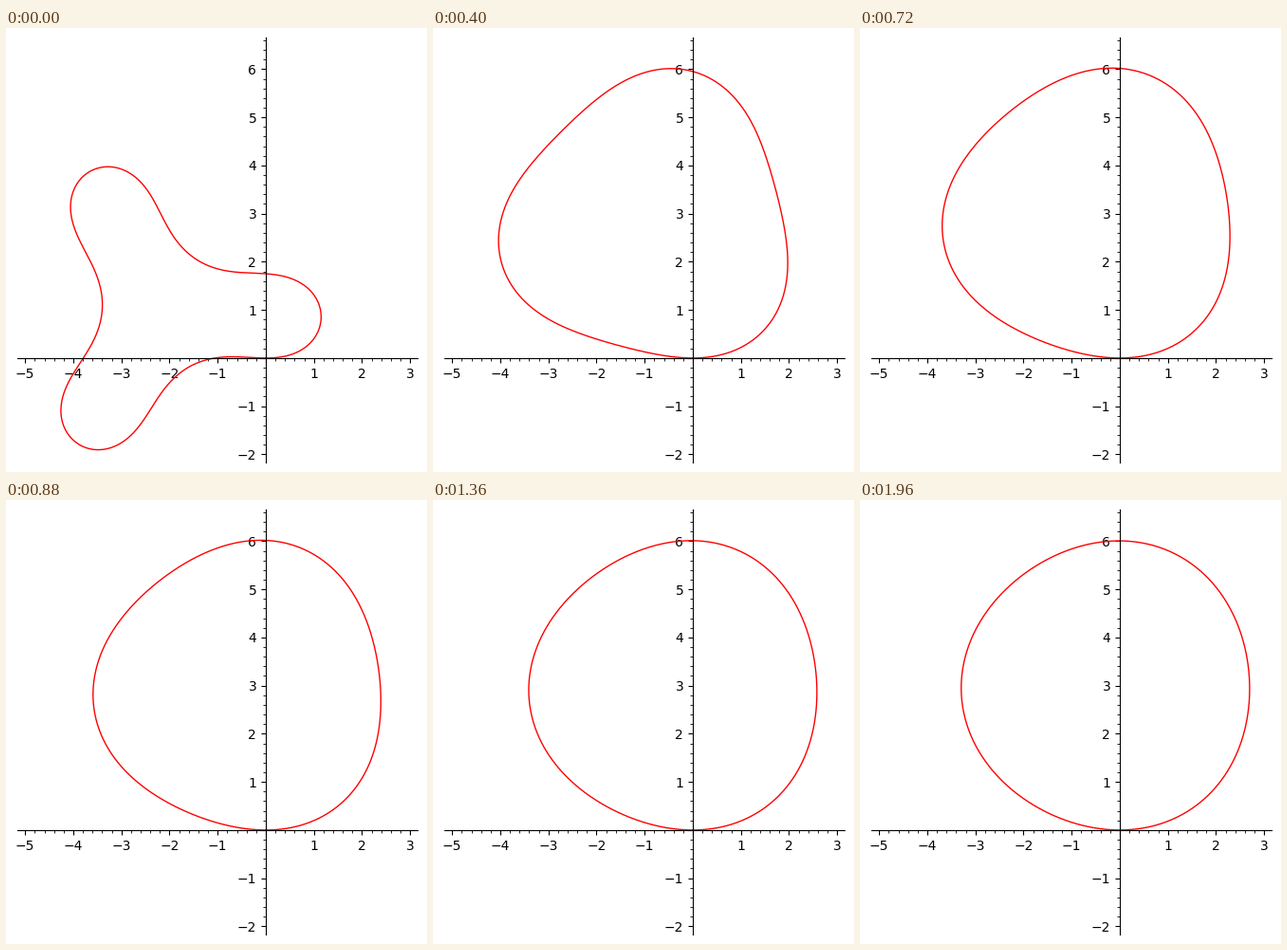
A matplotlib script that plays this animation: 444 by 468 pixels, repeating every 2000 ms.

```python
import numpy as np
import matplotlib.pyplot as plt
from matplotlib.animation import FuncAnimation
from matplotlib.ticker import AutoMinorLocator, FuncFormatter, MultipleLocator

W, H, DPI = 444, 468, 100
FRAMES, INTERVAL = 50, 40
UNIT = 50.75                # pixels per axis unit
X0, Y0 = 273.95, 347.875    # origin, in pixels from the top left
LEFT, RIGHT, TOP, BOTTOM = 12, 434, 10, 458

s = np.linspace(0, 6 * np.pi, 1801)
divisors = np.linspace(1, 15, FRAMES)


def curve(divisor):
    """Unit-speed curve through the origin with curvature 1/3 + sin(s)/divisor."""
    angle = s / 3 + (1 - np.cos(s)) / divisor

    def integrate(f):
        steps = (f[1:] + f[:-1]) / 2 * np.diff(s)
        return np.concatenate([[0], np.cumsum(steps)])

    return integrate(np.cos(angle)), integrate(np.sin(angle))


def label(value, _):
    n = round(value)
    return "" if n == 0 else str(n).replace("-", "\N{MINUS SIGN}")


plt.rcParams["font.family"] = "DejaVu Sans"
fig = plt.figure(figsize=(W / DPI, H / DPI), dpi=DPI, facecolor="white")
ax = fig.add_axes([LEFT / W, 1 - BOTTOM / H, (RIGHT - LEFT) / W, (BOTTOM - TOP) / H])
ax.set_xlim((LEFT - X0) / UNIT, (RIGHT - X0) / UNIT)
ax.set_ylim((Y0 - BOTTOM) / UNIT, (Y0 - TOP) / UNIT)
ax.patch.set_visible(False)

for side in ("top", "right"):
    ax.spines[side].set_visible(False)
for side in ("left", "bottom"):
    ax.spines[side].set_position("zero")
for axis in (ax.xaxis, ax.yaxis):
    axis.set_major_locator(MultipleLocator(1))
    axis.set_minor_locator(AutoMinorLocator(5))
    axis.set_major_formatter(FuncFormatter(label))
ax.tick_params(labelsize=10)

line, = ax.plot([], [], color="red", lw=1)


def update(frame):
    line.set_data(*curve(divisors[frame]))
    return line,


anim = FuncAnimation(fig, update, frames=FRAMES, interval=INTERVAL,
                     repeat=True, repeat_delay=0)
plt.show()
```
